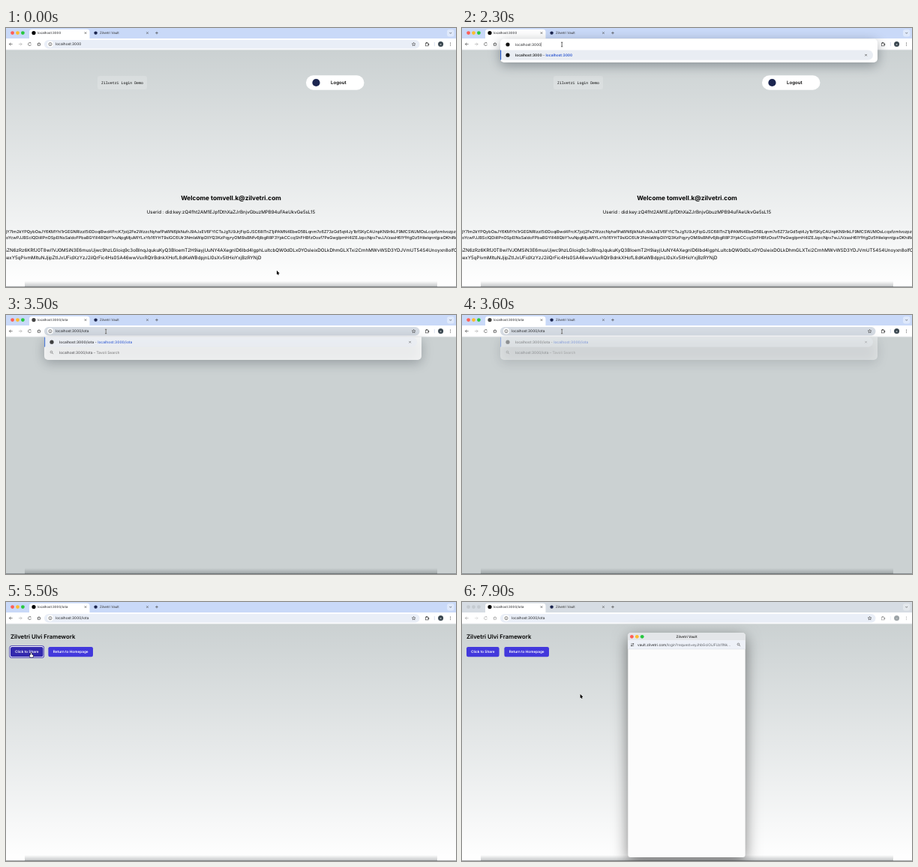
An HTML page with a canvas that plays this animation: 600x346 px, repeating every 8 s.

```html
<!DOCTYPE html>
<html lang="en">
<head>
<meta charset="utf-8">
<title>Login demo</title>
<style>
html, body { margin: 0; width: 100%; height: 100%; overflow: hidden; background: #cbd1d2; }
canvas { display: block; width: 600px; height: 346px; }
</style>
</head>
<body>
<canvas id="stage"></canvas>
<script>
const W = 600, H = 346, LOOP = 8000;
const canvas = document.getElementById('stage');
const ctx = canvas.getContext('2d');
const dpr = window.devicePixelRatio || 1;
canvas.width = W * dpr;
canvas.height = H * dpr;
ctx.textRendering = 'geometricPrecision';

const SANS = 'Inter, Roboto, sans-serif';
const MONO = '"Noto Sans Mono", "DejaVu Sans Mono", monospace';
const INK = '#1f2023', GREY = '#444', NAVY = '#1c2650';
const INDIGO = '#4238dc', INDIGO_DARK = '#3329ad';
const HOST = 'localhost:3000', ROUTE = '/iota';
const SMALL = 4.42, NORMAL = 4.85;

// Timeline in ms
const FOCUS = 1500, LIST = 1700, TYPE = 2500, ENTER = 3500, READY = 3700;
const PRESS = 5100, LEAVE = 5800, OPEN = 7000, LOADED = 7300;

const START = { x: 361, y: 324 };
const MOVES = [
  { from: 350, to: 600, x: 200, y: 88 },
  { from: 750, to: 1250, x: 133.2, y: 22 },
  { from: 4150, to: 5000, x: 33.6, y: 68 },
  { from: 5700, to: 6000, x: 127, y: 129 },
  { from: 7850, to: 7900, x: 157.6, y: 123 }
];

const clamp = v => Math.max(0, Math.min(1, v));
const ease = v => v * v * (3 - 2 * v);
const progress = (t, from, to) => clamp((t - from) / (to - from));

function pointer(t) {
  let { x, y } = START;
  for (const m of MOVES) {
    const k = ease(progress(t, m.from, m.to));
    x += (m.x - x) * k;
    y += (m.y - y) * k;
  }
  return { x, y };
}

// Token-like filler text
function token(seed, length) {
  const chars = 'ABCDEFGHIJKLMNOPQRSTUVWXYZabcdefghijklmnopqrstuvwxyz0123456789IliJjlsYzN';
  let s = '';
  while (s.length < length) {
    seed = (seed * 16807) % 2147483647;
    s += chars[seed % chars.length];
  }
  return s;
}
const TOKENS = [11, 23, 37, 53].map(seed => token(seed * 7919, 200));

function setFont(size, weight = 400, family = SANS) {
  ctx.font = `${weight} ${size}px ${family}`;
}

function text(s, x, y, size, color = INK, weight = 400, align = 'left', family = SANS) {
  setFont(size, weight, family);
  ctx.textAlign = align;
  ctx.fillStyle = color;
  ctx.fillText(s, x, y);
  return x + ctx.measureText(s).width;
}

function box(x, y, w, h, r, color) {
  ctx.beginPath();
  ctx.roundRect(x, y, w, h, r);
  ctx.fillStyle = color;
  ctx.fill();
}

function dot(x, y, r, color) {
  ctx.beginPath();
  ctx.arc(x, y, r, 0, 7);
  ctx.fillStyle = color;
  ctx.fill();
}

function ring(x, y, r, from = 0, to = 7) {
  ctx.beginPath();
  ctx.arc(x, y, r, from, to);
  ctx.strokeStyle = GREY;
  ctx.lineWidth = 0.6;
  ctx.stroke();
}

function line(x1, y1, x2, y2, color = GREY, width = 0.65) {
  ctx.beginPath();
  ctx.moveTo(x1, y1);
  ctx.lineTo(x2, y2);
  ctx.strokeStyle = color;
  ctx.lineWidth = width;
  ctx.stroke();
}

function cross(x, y, turn = Math.PI / 4) {
  for (const a of [turn, turn + Math.PI / 2]) {
    const dx = 1.8 * Math.cos(a), dy = 1.8 * Math.sin(a);
    line(x - dx, y - dy, x + dx, y + dy);
  }
}

// Two strokes that meet at (x, y); the arms point along dx, dy
function chevron(x, y, dx, dy, r, color = GREY) {
  line(x, y, x + (dx + dy) * r, y + (dy + dx) * r, color);
  line(x, y, x + (dx - dy) * r, y + (dy - dx) * r, color);
}

function arrow(x, y, dir, color) {
  line(x - 2.1, y, x + 2.1, y, color);
  chevron(x + 2.1 * dir, y, -dir, 0, 2, color);
}

function star(x, y, r) {
  ctx.beginPath();
  for (let i = 0; i < 10; i++) {
    const d = i % 2 ? r * 0.45 : r, a = i * Math.PI / 5 - Math.PI / 2;
    ctx.lineTo(x + d * Math.cos(a), y + d * Math.sin(a));
  }
  ctx.closePath();
  ctx.strokeStyle = GREY;
  ctx.lineWidth = 0.6;
  ctx.stroke();
}

function magnifier(x, y) {
  ring(x - 0.5, y - 0.5, 1.4);
  line(x + 0.6, y + 0.6, x + 2.1, y + 2.1);
}

function lights(x, y, active) {
  ['#ff5f57', '#febc2e', '#28c840'].forEach((c, i) =>
    dot(x + i * 6.9, y, 2.4, active ? c : '#c4cad0'));
}

function shadowed(blur, dy, color, draw) {
  ctx.save();
  ctx.shadowColor = color;
  ctx.shadowBlur = blur * dpr;
  ctx.shadowOffsetY = dy * dpr;
  draw();
  ctx.restore();
}

function fade(y, h, color, x = 0, w = W) {
  const g = ctx.createLinearGradient(0, y, 0, y + h);
  g.addColorStop(0, `rgba(${color},0)`);
  g.addColorStop(1, `rgba(${color},1)`);
  ctx.fillStyle = g;
  ctx.fillRect(x, y, w, h);
}

function loginPage() {
  box(122, 64, 66, 18, 3, 'rgba(255,255,255,.17)');
  text('Zilvetri Login Demo', 127, 74.6, 4.92, '#000', 500, 'left', MONO);
  box(400, 63.3, 77.5, 19.4, 9.7, '#fff');
  dot(413.5, 73, 5.1, NAVY);
  text('Logout', 433, 75.2, 6.1, '#000', 600);
  text('Welcome tomvell.k@zilvetri.com', W / 2, 230, 8.3, '#000', 700, 'center');
  text('Userid : did:key:zQ4fht2AM1EJpfDthXaZJrBnjvGbuzMPB94uFAeUkvGe5sL15',
    W / 2, 248.2, 6.2, '#000', 400, 'center');
  TOKENS.forEach((s, i) => {
    const large = i > 1, last = i === 3;
    const y = large ? 299.4 + (i - 2) * 10 : 273.6 + i * 8.4;
    text(s, last ? 340.5 : W / 2, y, large ? 6.22 : 5.55, '#000', 400, last ? 'right' : 'center');
  });
}

function button(label, x, w, color) {
  box(x, 60, w, 13.2, 2.2, color);
  text(label, x + w / 2, 68.3, 4.73, '#fff', 600, 'center');
}

function demoPage(t, mouse) {
  text('Zilvetri Ulvi Framework', 6, 48.9, 7.75, '#000', 600);
  if (t >= PRESS && t < OPEN) {
    box(4.4, 58.2, 46.7, 16.6, 3.4, INDIGO_DARK);
    box(5.2, 59, 45.1, 15, 2.8, '#fff');
  }
  button('Click to Share', 6, 43.6, overShare(mouse) ? INDIGO_DARK : INDIGO);
  button('Return to Homepage', 56.4, 59.6, INDIGO);
}

const overField = p => p.y > 15.5 && p.y < 28 && p.x > 51 && p.x < 552;
const overShare = p => p.y > 60 && p.y < 73.2 && p.x > 6 && p.x < 49.6;

function page(t, mouse) {
  ctx.fillStyle = '#cbd1d2';
  ctx.fillRect(0, 29, W, H);
  const loading = t >= ENTER && t < READY;
  if (!loading) {
    fade(29, H - 29, '255,255,255');
    if (t < ENTER) loginPage();
    else demoPage(t, mouse);
  }
  ctx.save();
  ctx.globalAlpha = 0.3;
  fade(338, 8, '50,58,62', 25, 550);
  ctx.restore();
  line(0, 345.6, W, 345.6, 'rgba(50,55,60,.6)', 0.8);
}

function tabs(t, active) {
  ctx.fillStyle = active ? '#c9d9f8' : '#d6dce3';
  ctx.fillRect(0, 0, W, 14.5);
  const y = 6.6;
  lights(8.6, y, active);
  box(31, 1.8, 80.5, 14, [3.5, 3.5, 0, 0], '#fff');
  dot(37, y, 2.6, t >= ENTER && t < READY ? GREY : '#000');
  text(HOST + (t >= ENTER ? ROUTE : ''), 42, 8.3, SMALL);
  dot(119.6, y, 2.2, NAVY);
  text('Zilvetri Vault', 125, 8.3, SMALL, '#333');
  cross(106, y);
  cross(188.5, y);
  cross(201, y, 0);
  box(588, 2, 9.5, 9.5, 3, active ? '#dfe9fb' : '#e4e8ec');
  chevron(592.7, 7.4, 0, -1, 1.4);
}

function toolbar(active) {
  const y = 21.6;
  ctx.fillStyle = '#fff';
  ctx.fillRect(0, 14, W, 15.2);
  line(0, 29, W, 29, '#dfe3e6', 0.5);
  ctx.save();
  if (!active) ctx.globalAlpha = 0.5;
  arrow(6.5, y, -1, GREY);
  arrow(19, y, 1, '#aaa');
  ring(31.5, y, 2, 0.3, 5.5);
  chevron(33.5, y - 0.9, -0.5, -0.5, 1.6);
  chevron(44, y - 2.2, 0, 1, 2.2);
  ctx.strokeRect(42.6, y - 0.6, 2.8, 2.6);
  ctx.strokeRect(559.3, y - 1.5, 3.8, 3.8);
  dot(561, y - 2, 0.9, GREY);
  dot(563.4, y + 0.4, 0.9, GREY);
  line(571.3, y - 2.6, 571.3, y + 2.6, '#c6d2e8');
  dot(579.6, y, 3.5, '#3a4750');
  text('a', 579.6, 22.7, 3.6, '#fff', 400, 'center');
  for (let i = -1; i < 2; i++) dot(592.5, y + i * 1.8, 0.5, GREY);
  ctx.restore();
}

function addressBar(t, mouse) {
  const focus = t >= FOCUS && t < LIST;
  const x = 66, label = HOST + (t >= ENTER ? ROUTE : '');
  box(51, 16, 500.5, 11.4, 5.7, focus ? '#3268d8' : overField(mouse) ? '#d5dbe3' : '#e9eef7');
  if (focus) {
    box(51.7, 16.7, 499.1, 10, 5, '#fff');
    setFont(NORMAL);
    box(x, 18.4, ctx.measureText(label).width, 6.6, 0, '#b8d5fb');
  }
  dot(59, 21.6, 4.1, '#fff');
  ring(59, 21.6, 2.1);
  line(59, 21.3, 59, 22.7);
  dot(59, 20.5, 0.35, GREY);
  text(label, x, 23.3, NORMAL);
  star(543.6, 21.8, 2.5);
}

function suggestions(t) {
  const open = t < ENTER;
  const count = t < TYPE ? 0 : Math.min(ROUTE.length, 1 + Math.ceil(Math.max(0, t - 2799) / 170));
  const typed = HOST + ROUTE.slice(0, count);
  const rest = count > 1 ? ROUTE.slice(count) : '';
  const rows = t < TYPE ? 1 : 2;
  const top = open ? 14.6 : 29.2, bottom = 32 + rows * 14;
  ctx.save();
  ctx.globalAlpha = 1 - progress(t, ENTER - 50, READY);
  shadowed(16, 4, 'rgba(30,40,50,.4)', () =>
    box(51, top, 503, bottom - top, open ? 5 : [0, 0, 5, 5], '#fff'));

  if (open) {
    dot(61, 22, 2.6, '#111');
    const end = text(typed, 71, 23.7, NORMAL);
    if (rest) {
      box(end, 18.6, ctx.measureText(rest).width, 6.8, 0, '#a9cbfa');
      text(rest, end, 23.7, NORMAL);
    } else {
      line(end + 0.3, 19.2, end + 0.3, 24.8, INK, 0.4);
    }
  }

  box(51, 29.6, 497, 13.2, [0, 6.6, 6.6, 0], '#e9edf3');
  box(51, 29.6, 1.2, 13.2, [0, 1, 1, 0], '#2b5fd0');
  dot(61, 36.2, 2.6, '#111');
  let x = text(typed, 71, 38, NORMAL, INK, 600);
  x = text(rest + ' - ', x, 38, NORMAL);
  x = text(typed, x, 38, NORMAL, '#2450cf', 600);
  text(rest, x, 38, NORMAL, '#2450cf');
  cross(538.6, 36.2);
  if (rows > 1) {
    magnifier(61, 50);
    x = text(typed, 71, 51.8, NORMAL);
    text(' – Tavoli Search', x, 51.8, NORMAL, '#555');
  }
  ctx.restore();
}

function popup(t) {
  const k = ease(progress(t, OPEN - 50, OPEN + 200)), s = 0.85 + 0.15 * k;
  const x = 221.3, w = 156.4, cx = x + w / 2, cy = 191;
  ctx.save();
  ctx.globalAlpha = k;
  ctx.translate(cx, cy);
  ctx.scale(s, s);
  ctx.translate(-cx, -cy);
  shadowed(20, 6, 'rgba(0,0,0,.5)', () => box(x, 41.3, w, 299.8, 3.5, '#fcfcfc'));
  box(x, 41.3, w, 10, [3.5, 3.5, 0, 0], '#e4e6e9');
  box(x, 51.2, w, 11.8, 0, '#eef1f8');
  line(x, 63, x + w, 63, '#d5d8dd', 0.5);
  lights(226.4, 46.3, true);
  if (t >= LOADED) {
    text('Zilvetri Vault', cx, 47.9, 4.6, '#333', 600, 'center');
    for (const d of [-1, 1]) {
      line(225.2, 57.2 + d * 1.2, 229.2, 57.2 + d * 1.2);
      dot(227.2 - d * 1.2, 57.2 + d * 1.2, 0.8, GREY);
    }
    const end = text('vault.zilvetri.com', 234, 58.9, 4.75);
    text('/login?request=eyJhbGciOiJFUzI1Nk...', end, 58.9, 4.75, '#5a5d63');
    magnifier(369, 57);
  }
  ctx.restore();
}

function beam(color, width) {
  line(0, -2.6, 0, 2.6, color, width);
  for (const y of [-2.8, 2.8]) line(-1.2, y, 1.2, y, color, width);
}

function hand(grow, color) {
  box(-0.6 - grow, -grow, 1.2 + 2 * grow, 4 + 2 * grow, 0.6, color);
  box(-1.8 - grow, 2.4 - grow, 4.4 + 2 * grow, 3.4 + 2 * grow, 1.2, color);
}

function arrowhead() {
  ctx.beginPath();
  ctx.lineTo(0, 0);
  ctx.lineTo(0, 5.2);
  ctx.lineTo(3.7, 3.7);
  ctx.closePath();
  ctx.strokeStyle = '#fff';
  ctx.lineWidth = 0.8;
  ctx.stroke();
  line(1, 3, 2.4, 6, '#000', 1);
  ctx.fillStyle = '#000';
  ctx.fill();
  ctx.beginPath();
  ctx.lineTo(0, 0);
  ctx.lineTo(0, 5.2);
  ctx.lineTo(3.7, 3.7);
  ctx.fill();
}

function cursor(mouse, t) {
  ctx.save();
  ctx.translate(mouse.x, mouse.y);
  if (overField(mouse)) {
    beam('#fff', 1.3);
    beam('#111', 0.65);
  } else if (t >= READY && overShare(mouse)) {
    hand(0.4, '#111');
    hand(0, '#fff');
  } else {
    arrowhead();
  }
  ctx.restore();
}

function draw(t) {
  ctx.setTransform(dpr, 0, 0, dpr, 0, 0);
  const active = t < OPEN, mouse = pointer(t);
  page(t, mouse);
  tabs(t, active);
  toolbar(active);
  addressBar(t, mouse);
  if (t >= LIST && t < READY) suggestions(t);
  if (!active) popup(t);
  cursor(mouse, t);
}

function tick(now) {
  draw(now % LOOP);
  requestAnimationFrame(tick);
}
requestAnimationFrame(tick);
</script>
</body>
</html>
```
